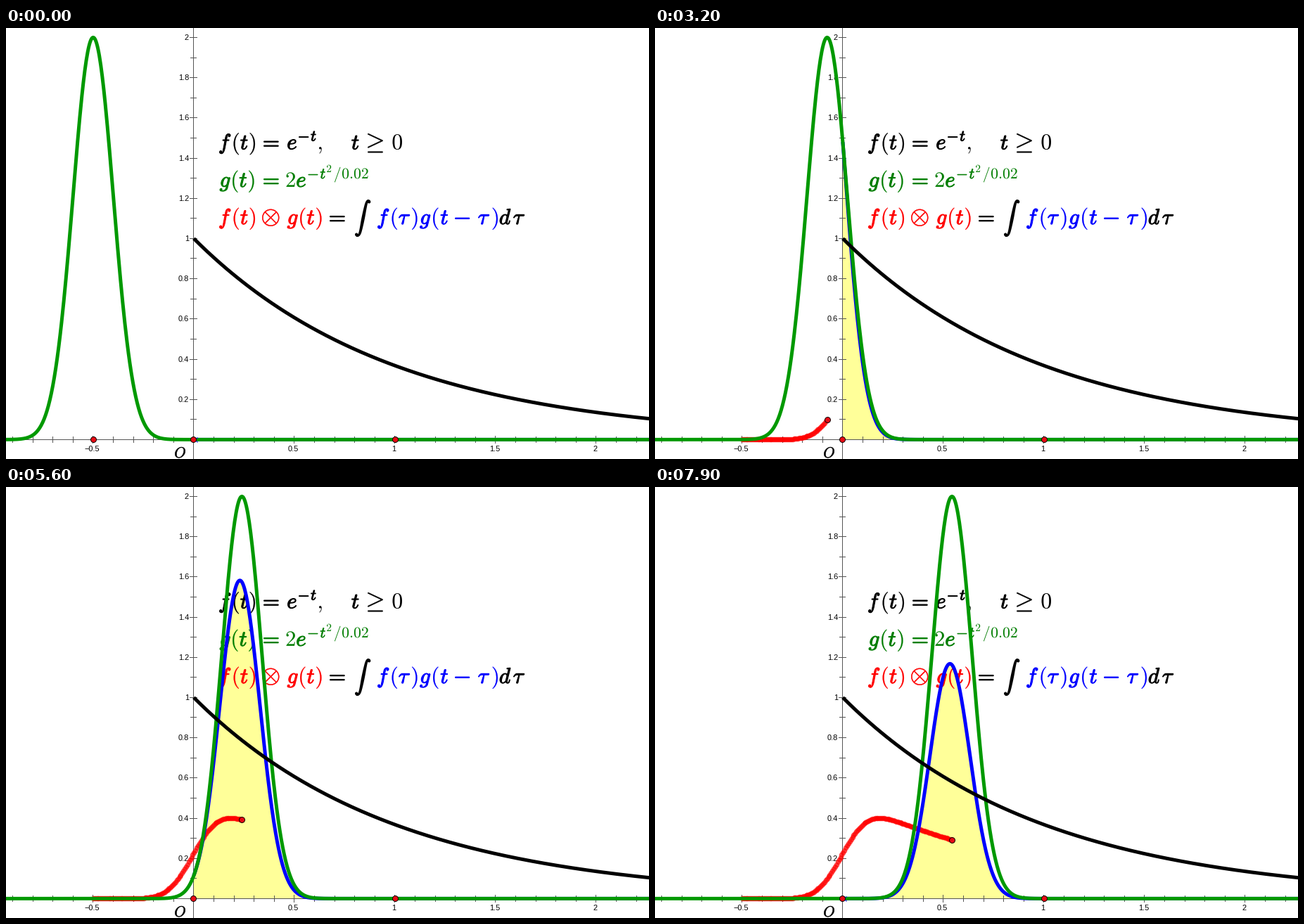
These frames come from a looping animation (914x613 px, 8000 ms). A matplotlib script:

```python
import math

import matplotlib.pyplot as plt
import numpy as np
from matplotlib.animation import FuncAnimation
from matplotlib.patches import PathPatch
from matplotlib.textpath import TextPath
from matplotlib.transforms import Affine2D

W, H, DPI = 914, 613, 64
PT = 72 / DPI                      # points per pixel
OX, OY, UNIT = 266.9, 585.4, 286   # origin and scale in pixels
FRAMES, INTERVAL = 80, 100
T0, STEP = -0.5, 0.0132
SUB = 2                            # trace dots per step
SIGMA = 0.1
LOW = 0.003                        # lower bound of the integral
EM = 31                            # formula size in pixels
ADVANCE = {"f": 20.5, "g": 18.5, "t": 13.5, r"\tau": 19}

GREEN, TEXT_GREEN = "#009900", "#007d00"
RED, BLUE, YELLOW = "#ff0000", "#0000ff", "#ffff99"
GRAY = "#555555"

plt.rcParams["mathtext.fontset"] = "cm"
plt.rcParams["font.family"] = "Liberation Sans"


def px(x):
    return OX + UNIT * np.asarray(x)


def py(y):
    return OY - UNIT * np.asarray(y)


def f(t):
    return np.exp(-t)


def g(t):
    return 2 * np.exp(-t**2 / 0.02)


def conv(t):
    """Closed form of the integral of f(s) g(t - s) for s > LOW."""
    z = (t - SIGMA**2 - LOW) / SIGMA
    area = 2 * SIGMA * math.sqrt(2 * math.pi)
    phi = 0.5 * (1 + math.erf(z / math.sqrt(2)))
    return area * math.exp(-t + SIGMA**2 / 2) * phi


fig = plt.figure(figsize=(W / DPI, H / DPI), dpi=DPI, facecolor="white")
ax = fig.add_axes([0, 0, 1, 1])
ax.set_xlim(0, W)
ax.set_ylim(H, 0)
ax.axis("off")


def pixel(v):
    """Centre of the pixel that holds v."""
    return math.floor(v) + 0.5


def segment(x0, y0, x1, y1):
    ax.plot([x0, x1], [y0, y1], color=GRAY, lw=PT, snap=False,
            solid_capstyle="butt", zorder=1)


def label(x, y, value, ha):
    s = f"{value:g}".replace("-", "\u2212")
    ax.text(x, y, s, size=11 * PT, ha=ha, va="baseline", zorder=1)


def draw_axes():
    x0, y0 = pixel(OX), pixel(OY)
    segment(0, y0, W, y0)
    segment(x0, 0, x0, H)
    for k in range(-9, 23):
        if k == 0:
            continue
        x = pixel(px(k / 10))
        half = 5.5 if k % 5 == 0 else 4.5
        segment(x, y0 - half, x, y0 + half)
        if k % 5 == 0:
            label(x - 1, 602.5, k / 10, "center")
    for k in range(1, 21):
        y = pixel(py(k / 10))
        half = 5.5 if k % 2 == 0 else 4.5
        segment(x0 - half, y, x0 + half, y)
        if k % 2 == 0:
            label(260, y + 3.5, k / 10, "right")


def glyph(s, x, base, color="black", size=EM, bold=1.1):
    """Math text whose ink starts at x, thickened by a stroke for bold."""
    path = TextPath((0, 0), f"${s}$", size=size)
    left = path.get_extents().x0
    place = Affine2D().translate(-left, 0).scale(1, -1)
    place.translate(x + bold / 2, base)
    ax.add_patch(PathPatch(place.transform_path(path), facecolor=color,
                           edgecolor=color if bold else "none",
                           lw=bold * PT, joinstyle="round", zorder=3))


def call(name, arg, x, base, color):
    """Write name(arg) with the bold letter starting at x."""
    glyph(name, x, base, color)
    x += ADVANCE[name]
    glyph("(", x, base, color, bold=0.3)
    x += 9.5
    glyph(arg, x, base, color)
    glyph(")", x + ADVANCE[arg], base, color, bold=0.3)


def draw_formulas():
    small = 0.7 * EM

    base = 172.5
    call("f", "t", 303, base, "black")
    glyph("=", 366, base)
    glyph("e", 400, base)
    glyph("-", 416, base - 12, size=small)
    glyph("t", 433, base - 12, size=small)
    glyph(",", 445, base, bold=0)
    glyph("t", 491, base)
    glyph(r"\geq", 514, base, size=35, bold=0.5)
    glyph("0", 549.5, base, size=32, bold=0)

    base = 226
    call("g", "t", 303.5, base, TEXT_GREEN)
    glyph("=", 366, base, TEXT_GREEN)
    glyph("2", 398.5, base, TEXT_GREEN, bold=0)
    glyph("e", 413, base, TEXT_GREEN)
    glyph("-", 429.5, base - 12, TEXT_GREEN, small, 0.7)
    glyph("t", 446.5, base - 12, TEXT_GREEN, small, 0.7)
    glyph("2", 456, base - 21, TEXT_GREEN, EM / 2, 0)
    glyph("/", 467, base - 12, TEXT_GREEN, small, 0)
    glyph("0.02", 478, base - 12, TEXT_GREEN, small, 0)

    base = 279
    call("f", "t", 303, base, RED)
    glyph(r"\otimes", 364, base, RED, 36, 0.6)
    call("g", "t", 399.5, base, RED)
    glyph("=", 460, base)
    whole = TextPath((0, 0), r"$\int$", size=100).get_extents()
    size = 5100 / whole.height
    glyph(r"\int", 496, 296 + whole.y0 * size / 100, size=size, bold=2)
    call("f", r"\tau", 528, base, BLUE)
    glyph("g", 588, base, BLUE)
    glyph("(", 607, base, BLUE, bold=0.3)
    glyph("t", 617.5, base, BLUE)
    glyph("-", 638, base, BLUE, 33)
    glyph(r"\tau", 671, base, BLUE)
    glyph(")", 691.5, base, BLUE, bold=0.3)
    glyph("d", 701.5, base)
    glyph(r"\tau", 721, base)

    glyph("O", 240, 611, size=21, bold=0.6)


def curve(color, zorder):
    return ax.plot([], [], color=color, lw=5 * PT, solid_capstyle="butt",
                   solid_joinstyle="round", snap=False, zorder=zorder)[0]


def dot(x, y, zorder):
    return ax.plot([x], [y], "o", ms=8 * PT, mfc="#e60a14", mec="black",
                   mew=0.9 * PT, snap=False, zorder=zorder)[0]


draw_axes()
draw_formulas()

xs = np.linspace(-0.95, 2.3, 900)
xp = np.linspace(0, 2.3, 700)

trace = ax.plot([], [], "o", ms=7.5 * PT, mfc=RED, mec="none", alpha=0.7,
                snap=False, zorder=4)[0]
cross = ax.plot([268], [OY], "x", ms=7 * PT, mec=BLUE, mew=PT, zorder=8)[0]
product = curve(BLUE, 5)
kernel = curve(GREEN, 6)
decay = curve("black", 7)
decay.set_data(px(xp), py(f(xp)))
fill = ax.fill([0, 0, 0], [0, 0, 0], color=YELLOW, lw=0, zorder=0.5)[0]
dot(266, OY, 9)
dot(px(1), OY, 9)
mover = dot(0, 0, 10)


def update(n):
    ts = T0 + STEP / SUB * np.arange(SUB * n + 1)
    ys = [conv(t) for t in ts]
    t = ts[-1]
    fg = f(xp) * g(t - xp)
    kernel.set_data(px(xs), py(g(xs - t)))
    product.set_data(px(xp), py(fg))
    outline = np.column_stack([px(xp), py(fg)])
    fill.set_xy(np.vstack([[OX, OY], outline, [px(2.3), OY]]))
    trace.set_data(px(ts), py(ys))
    mover.set_data([px(t)], [py(ys[-1])])
    cross.set_visible(bool(g(t) < 0.004))
    return fill, trace, cross, product, kernel, mover


anim = FuncAnimation(fig, update, frames=FRAMES, interval=INTERVAL,
                     repeat=True, repeat_delay=0, blit=False)
plt.show()
```
